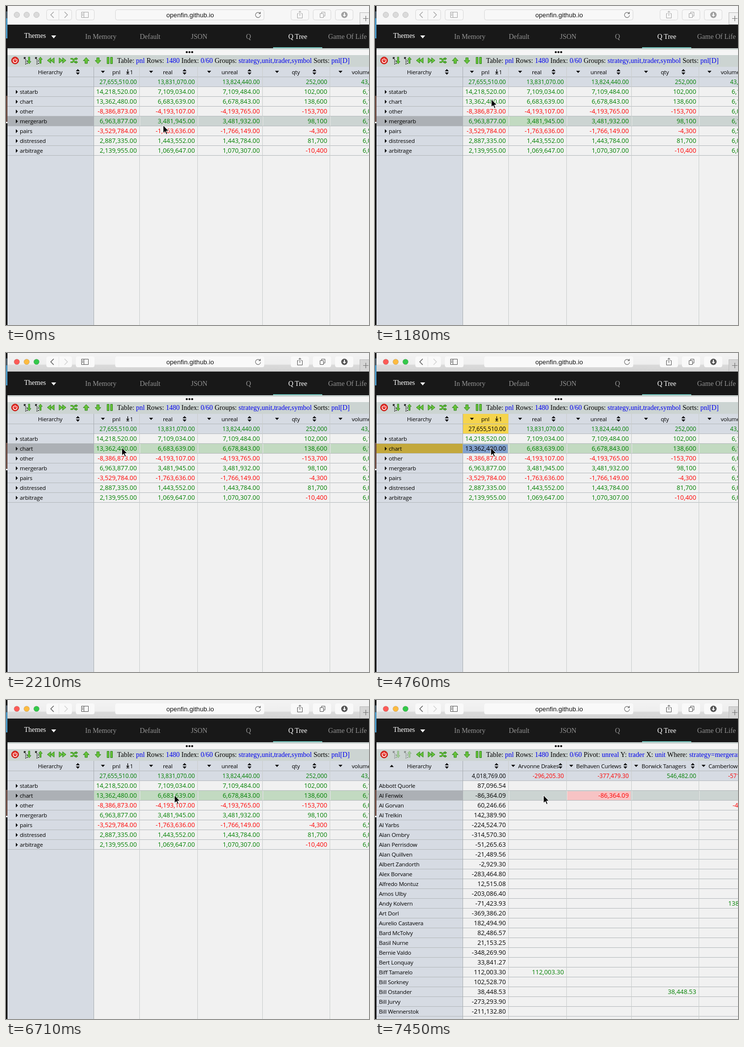
Recreate the animation shown at these times as an HTML page. Size 738x650 px, loop 8000 ms.

```html
<!DOCTYPE html>
<html lang="en">
<head>
<meta charset="utf-8">
<title>Pivot grid</title>
<style>
html, body { margin: 0; width: 100%; height: 100%; overflow: hidden; background: #f1f1f1; }
svg { display: block; width: 738px; height: 650px; }
text { white-space: pre; }
.nav { font: 14px "Liberation Serif", serif; }
.label { font: 11.5px "Open Sans", sans-serif; letter-spacing: -.2px; }
.sum { font: 11.75px "Open Sans", sans-serif; }
.num { font: 12.8px "Open Sans", sans-serif; }
.url { font: 13px "Liberation Sans", sans-serif; letter-spacing: .08px; }
.end { text-anchor: end; }
</style>
</head>
<body>
<svg viewBox="0 0 738 650" xmlns="http://www.w3.org/2000/svg">
  <defs>
    <linearGradient id="bar" x1="0" y1="0" x2="0" y2="1">
      <stop offset="0" stop-color="#f3f3f3"/><stop offset=".6" stop-color="#eeeeee"/>
      <stop offset=".65" stop-color="#dadada"/><stop offset="1" stop-color="#d3d3d3"/>
    </linearGradient>
  </defs>
  <g id="scene"></g>
  <path id="cursor" d="M0 0V16L3.7 12.6L6.2 18.6L8.7 17.5L6.2 11.8H11.3Z" fill="#000" stroke="#fff" stroke-width="1"/>
</svg>
<script>
const LOOP = 8000;
const scene = document.getElementById('scene');
const cursor = document.getElementById('cursor');

const GREEN = '#008000', RED = '#ff0000', BLACK = '#000';
const PANEL = '#d6dbe3', SAGE = '#ccd4d2', LINE = '#b4b9bc';
const cols = [178, 271, 389, 521, 658, 790];

// time, x, y of the pointer tip
const moves = [
  [0, 319, 243], [150, 422, 326], [290, 460, 414], [440, 447, 404], [590, 342, 292],
  [740, 270, 217], [890, 259, 216], [1040, 239, 193], [1180, 236, 190], [1480, 235, 192],
  [2210, 235, 193], [6710, 342, 194]
];

const groups = `statarb|14,218,520.00|7,109,034.00|7,109,484.00|102,000|6,1
chart|13,362,480.00|6,683,639.00|6,678,843.00|138,600|6,1
other|-8,386,873.00|-4,193,107.00|-4,193,765.00|-153,700|6,0
mergerarb|6,963,877.00|3,481,945.00|3,481,932.00|98,100|6,1
pairs|-3,529,784.00|-1,763,636.00|-1,766,149.00|-4,300|6,5
distressed|2,887,335.00|1,443,552.00|1,443,784.00|81,700|6,0
arbitrage|2,139,955.00|1,069,647.00|1,070,307.00|-10,400|6,0`.split('\n').map(r => r.split('|'));

const people = `Abbott Quorle|87,096.54
Al Fenwix|-86,364.09||-86,364.09
Al Gorvan|60,246.66||||-4
Al Trelkin|142,389.90
Al Yarbs|-224,524.70
Alan Ombry|-314,570.30
Alan Perrisdow|-51,265.63
Alan Quillven|-21,489.56
Albert Zandorth|-2,929.30
Alex Borvane|-283,464.80
Alfredo Montuz|12,515.08
Amos Ulby|-203,086.40
Andy Kolvern|-71,423.93||||138
Art Dorl|-369,386.20
Aurelio Castavera|182,494.90
Bard McTolvy|82,486.57
Basil Nurne|21,153.25
Bernie Valdo|-348,269.90
Bert Lonquay|33,841.27
Biff Tamarelo|112,003.30|112,003.30
Bill Sorkney|102,528.70
Bill Ostander|38,448.53|||38,448.53
Bill Jurvy|-273,293.90
Bill Wennerstok|-211,132.80`.split('\n').map(r => r.split('|'));

const rect = (x, y, w, h, fill, more = '') =>
  `<rect x="${x}" y="${y}" width="${w}" height="${h}" fill="${fill}" ${more}/>`;
const text = (x, y, s, cls, fill = BLACK) =>
  `<text x="${x}" y="${y}" class="${cls}" fill="${fill}">${s}</text>`;
const path = (d, fill, stroke = 'none', w = 1, more = '') =>
  `<path d="${d}" fill="${fill}" stroke="${stroke}" stroke-width="${w}" ${more}/>`;
const circle = (x, y, r, fill, stroke = 'none') =>
  `<circle cx="${x}" cy="${y}" r="${r}" fill="${fill}" stroke="${stroke}"/>`;
const hue = s => s[0] === '-' ? RED : GREEN;

const menuMark = x => path(`M${x - 4} 132h8l-4 4.5z`, BLACK);
const sortMark = x => path(`M${x - 4} 133l4-4.5 4 4.5zM${x - 4} 135.5h8l-4 4.5z`, BLACK);

function desktop() {
  return rect(0, 0, 3, 650, '#151515') + rect(0, 11, 3, 14, '#4a5a66') +
    rect(0, 25, 3, 41, '#4795c2') + rect(0, 183, 3, 53, '#6a4b42') + rect(0, 236, 3, 3, '#e8e8e8');
}

function browser(active, edge) {
  const ink = active ? '#555' : '#a3a3a3';
  const box = (x, w, y = 7, h = 22) => active
    ? rect(x, y, w, h, '#f9f9f9', 'rx="4"')
    : rect(x + .5, y + .5, w - 1, h - 1, '#f8f8f8', 'rx="4" stroke="#d8d8d8"');
  const lights = active ? ['#fc5b57', '#fdbb40', '#34c84a'] : Array(3).fill('#dadada');
  let s = rect(3, 0, 735, 38, active ? 'url(#bar)' : '#f6f6f6');
  lights.forEach((c, i) => s += circle(22 + 20 * i, 18, 5.6, c, active ? 'rgba(0,0,0,.15)' : '#c6c6c6'));
  s += box(82, 52) + box(142, 38) + box(222, 303) + box(579, 37) + box(624, 37) + box(669, 37);
  s += rect(107, 8, 1, 20, active ? '#e6e6e6' : '#d8d8d8');
  s += path('M97 12l-6 6 6 6', 'none', ink, 1.4) + path('M119 12l6 6-6 6', 'none', active ? '#d0d0d0' : ink, 1.4);
  s += path('M153.5 12.5h14v11h-14zM158.5 12.5v11M155 15.5h2M155 17.5h2M155 19.5h2', 'none', ink);
  s += text(326, 23, 'openfin.github.io', 'url', '#111');
  s += path('M516.6 15.2a5.2 5.2 0 1 0 1 3.6', 'none', '#777', 1.2) + path('M517.8 11.5v4.7h-4.6z', '#777');
  s += path('M595 15.5h-2.5v9h10v-9H600M597.5 20v-9.5M594.5 13.2l3-3 3 3', 'none', ink);
  s += path('M638.5 15.5h7v8h-7zM641.5 15v-2.5h7v8H646', 'none', ink);
  s += circle(688, 18, 6.5, active ? '#555' : '#a0a0a0') +
    path('M687 14h2v4h2.5l-3.5 4-3.5-4h2.5z', '#fff');
  s += rect(719.5, 13.5, 24, 24, active ? '#d5d5d5' : '#f1f1f1', 'stroke="#bbb"') +
    path('M726 25.5h11M731.5 20v11', 'none', '#777', 1.2);
  if (edge) s += rect(3, 37, 735, 1, '#b0b0b0');
  return s;
}

function navigation() {
  const tabs = [[161, 'In Memory'], [272, 'Default'], [376, 'JSON'], [488, 'Q'], [574, 'Q Tree'], [655, 'Game Of Life']];
  let s = rect(3, 38, 735, 48, '#181818') + text(37, 65, 'Themes', 'nav', '#fff') + path('M92 60h10l-5 6z', '#fff');
  for (const [x, name] of tabs) s += text(x, 67, name, 'nav', name === 'Q Tree' ? '#fff' : '#939393');
  s += rect(543, 84, 100, 2, '#72c2ba');
  s += rect(3, 86, 735, 38, SAGE) + rect(3, 89, 735, 11, '#f5f5f5');
  for (const x of [367.5, 373, 378.5]) s += circle(x, 94, 2.1, BLACK);
  return s;
}

function treeIcon(x, up) {
  const dots = [[0, 0], [2, 4], [2, 8], [2, 12], [5, 6], [5, 11]];
  return path(`M${x + .5} 104.5h3v3h-3z`, '#fff', '#333') +
    dots.map(([a, b]) => rect(x + a + 1, 105 + b, 2, 2, '#333')).join('') +
    path(up ? `M${x + 11} 104l4 5h-2.5v8h-3v-8H${x + 7}z` : `M${x + 11} 118l4-5h-2.5v-9h-3v9H${x + 7}z`, '#62c035', '#2c7d1c', .8);
}

function toolbar(pivot) {
  const green = d => path(d, '#69c43a', '#2c861c', 1, 'stroke-linejoin="round"');
  let s = circle(18.5, 111, 7.2, '#e0241c', '#b5130e') +
    path('M16 108.2a4 4 0 1 0 5 0M18.5 106v5', 'none', '#fff', 1.5);
  s += `<g opacity="${pivot ? .4 : 1}">${treeIcon(36, false)}${treeIcon(59, true)}</g>`;
  s += green('M91 105.500v11l-7-5.500zM98 105.500v11l-7-5.500z') + green('M108 105.500v11l7-5.500zM115 105.500v11l7-5.500z');
  const cross = 'M131 107.500h4l5 7h3M131 114.500h4l5-7h3';
  s += path(cross, 'none', '#2c861c', 3) + path(cross, 'none', '#69c43a', 1.3) +
    green('M142 105l4 2.500-4 2.500zM142 112l4 2.500-4 2.500z');
  s += green('M163 105l6 6.500h-3.500v5.500h-5v-5.500H157z') + green('M187 117.500l6-6.500h-3.500v-5.500h-5v5.500H181z');
  s += green('M205.500 104.500h4v13h-4zM212.500 104.500h4v13h-4z');
  const info = [['Table', 'pnl'], ['Rows', '1480'], ['Index', '0/60']].concat(pivot
    ? [['Pivot', 'unreal'], ['Y', 'trader'], ['X', 'unit'], ['Where', 'strategy=mergerarb']]
    : [['Groups', 'strategy,unit,trader,symbol'], ['Sorts', 'pnl[D]']]);
  return s + text(226, 116, info.map(([k, v]) => `${k}: <tspan fill="#0000f0">${v}</tspan>`).join(' '), 'nav');
}

function header(pivot, sel) {
  let s = rect(3, 124, 735, 40, PANEL);
  if (sel) s += rect(cols[sel - 1] + 1, 124, cols[sel] - cols[sel - 1] - 1, 40, '#f5d44c');
  s += text(65, 139, 'Hierarchy', 'label') + sortMark(146);
  const heads = pivot
    ? [[281, 291, 'Arvonne Drakes', 377], [399, 409, 'Belhaven Curlews', 509], [531, 542, 'Borwick Tanagers', 646], [668, 678, 'Camberlow A', 0]]
    : [[197, 216, 'pnl', 0], [295, 319, 'real', 363], [413, 438, 'unreal', 495], [551, 581, 'qty', 627], [680, 703, 'volume', 0]];
  for (const [m, x, name, sort] of heads)
    s += menuMark(m) + text(x, 139, name, 'label') + (sort ? sortMark(sort) : '');
  s += pivot
    ? path('M30 136.500h8l-4-4.500z', BLACK) + sortMark(247)
    : path('M247.500 129v8M245 134l2.500 3 2.500-3M244.500 138.500h6', 'none', BLACK, 1.2) + text(252, 139, '1', 'label');
  const sums = pivot
    ? ['4,018,769.00', '-296,205.30', '-377,479.30', '546,482.00', '-571,']
    : ['27,655,510.00', '13,831,070.00', '13,824,440.00', '252,000', '43,'];
  sums.forEach((v, i) => {
    const fill = (pivot && !i) || sel === i + 1 ? BLACK : hue(v);
    s += i < 4 ? text(cols[i + 1] - 5, 159, v, 'sum end', fill) : text(pivot ? 718 : 722, 159, v, 'sum', fill);
  });
  return s + rect(3, 144, 735, 1, LINE);
}

function body({ pivot, hover, sel, trail }) {
  const rows = pivot ? people : groups;
  const top = 165 + 20 * hover;
  let s = rect(3, 164, 735, 486, '#f1f1f1') + rect(3, 164, 175, 486, PANEL);
  s += rect(179, top, 559, 19, pivot || hover === 3 ? SAGE : '#c2dac1');
  s += rect(3, top, 175, 19, sel ? '#c3a83c' : '#acb0b5');
  if (trail) s += rect(258, top, 96, 19, '#c2dac1');
  if (pivot) s += rect(391, top + 1, 129, 18, '#f7c3c4');
  if (sel) s += rect(cols[sel - 1] + 1, top + 1, cols[sel] - cols[sel - 1] - 2, 18, '#82a1cd');
  for (let i = 0; i <= rows.length; i++) s += rect(3, 164 + 20 * i, 735, 1, LINE);
  cols.forEach((x, i) => {
    s += rect(x, 124, 1, 526, i ? '#c9cdcc' : '#a9aeb3');
    if (i) s += rect(x + 1, top, 1, 19, '#e4e8e6');
  });
  rows.forEach(([name, ...vals], r) => {
    const y = 179 + 20 * r;
    s += text(pivot ? 8 : 28, y, name, 'label');
    if (!pivot) s += path(`M20 ${y - 8}l4 4-4 4z`, BLACK);
    vals.forEach((v, i) => {
      if (!v) return;
      const fill = (pivot && !i) || (r === hover && sel === i + 1) ? BLACK : hue(v);
      const x = pivot ? (v[0] === '-' ? 727 : 718) : 725;
      s += i < 4 ? text(cols[i + 1] - 5, y, v, 'num end', fill) : text(x, y, v, 'num', fill);
    });
  });
  return s;
}

const within = (t, a, b) => t >= a && t < b;
let last = '';

function render(t) {
  const state = {
    active: t >= 1480,
    edge: t >= 1620,
    pivot: t >= 7450,
    hover: t < 2070 ? 3 : 1,
    sel: within(t, 4760, 5810) ? 1 : within(t, 7150, 7300) ? 2 : 0,
    trail: within(t, 740, 2070)
  };
  const key = JSON.stringify(state);
  if (key !== last) {
    last = key;
    scene.innerHTML = desktop() + browser(state.active, state.edge) + navigation() +
      toolbar(state.pivot) + header(state.pivot, state.sel) + body(state);
  }
  const [, x, y] = moves.filter(m => m[0] <= t).pop();
  cursor.setAttribute('transform', `translate(${x + .5} ${y})`);
}

const start = performance.now();
function tick() {
  render((performance.now() - start) % LOOP);
  requestAnimationFrame(tick);
}
tick();
</script>
</body>
</html>
```
